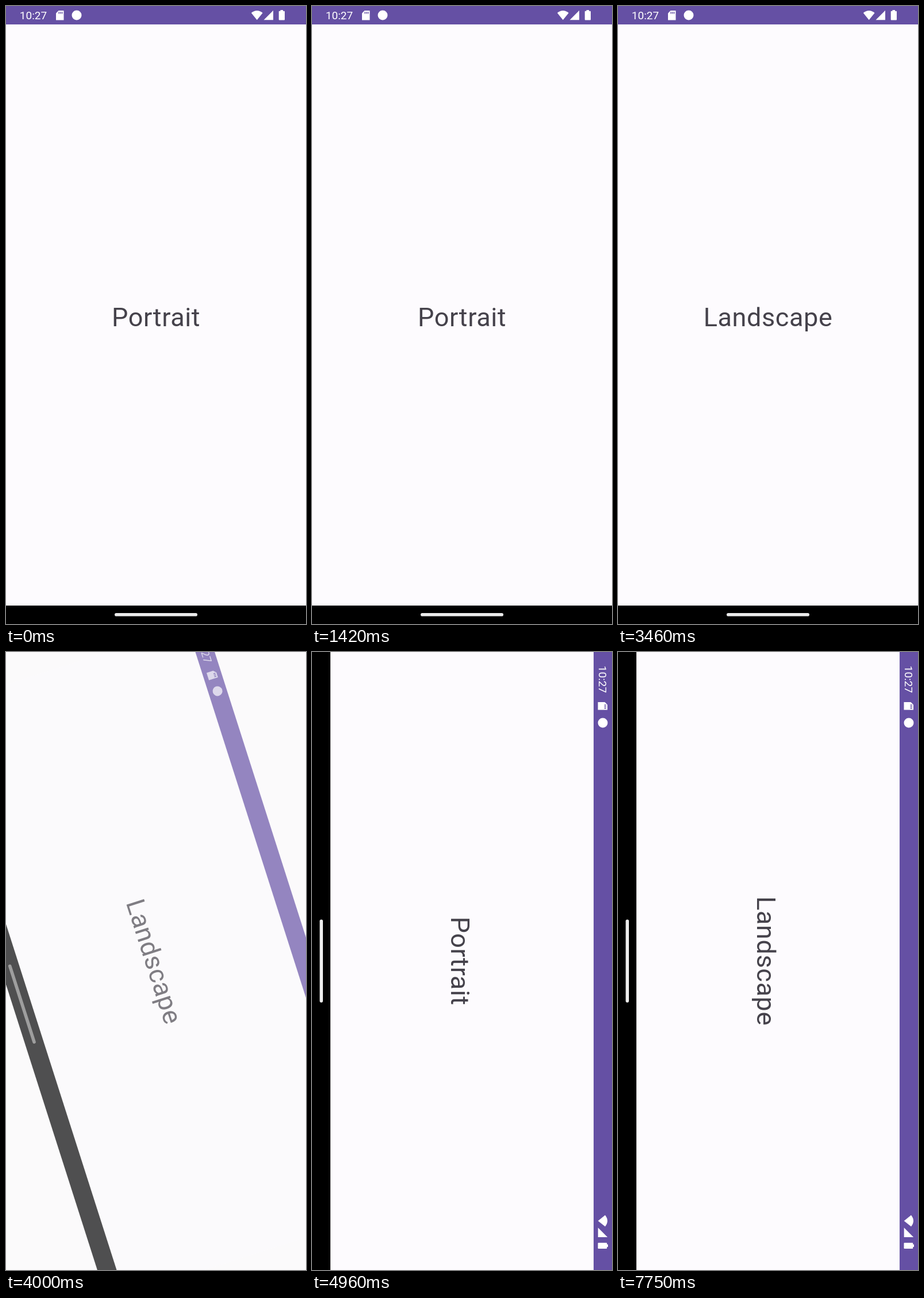
An HTML page with a canvas for the animation above (8 s loop, 522 by 1073 pixels).

```html
<!DOCTYPE html>
<html lang="en">
<head>
<meta charset="utf-8">
<title>Screen rotation</title>
<style>
  html, body { margin: 0; width: 100%; height: 100%; overflow: hidden; background: #fdfbfe; }
  canvas { display: block; }
</style>
</head>
<body>
<canvas id="stage" width="522" height="1073"></canvas>
<script>
const W = 522, H = 1073, LOOP = 8000, BAR = 32;
const TURN_START = 3827, TURN_TIME = 333;
const ctx = document.getElementById('stage').getContext('2d');

const clamp = x => Math.min(1, Math.max(0, x));

// cubic-bezier(0.4, 0, 0.2, 1), solved by bisection
function fastOutSlowIn(x) {
  let lo = 0, hi = 1, u = 0.5;
  for (let i = 0; i < 24; i++) {
    u = (lo + hi) / 2;
    const s = 1 - u;
    if (1.2 * s * s * u + 0.6 * s * u * u + u ** 3 < x) lo = u; else hi = u;
  }
  return 3 * u * u * (1 - u) + u ** 3;
}

function label(t) {
  return t < 3460 || (t >= 4960 && t < 7750) ? 'Portrait' : 'Landscape';
}

function rect(x, y, w, h, color) {
  ctx.fillStyle = color;
  ctx.fillRect(x, y, w, h);
}

function roundRect(x, y, w, h, r) {
  ctx.beginPath();
  ctx.roundRect(x, y, w, h, r);
  ctx.fill();
}

function polygon(...points) {
  ctx.beginPath();
  points.forEach(([x, y]) => ctx.lineTo(x, y));
  ctx.closePath();
  ctx.fill();
}

function text(str, x, y, size, align, spacing) {
  ctx.font = `${size}px Roboto, sans-serif`;
  ctx.letterSpacing = spacing + 'px';
  ctx.textAlign = align;
  ctx.fillText(str, x, y);
}

function statusBar(w) {
  const purple = '#6550a4';
  rect(0, 0, w, BAR, purple);
  ctx.fillStyle = '#fff';
  text('10:27', 23.8, 23, 19, 'left', 0);

  // memory card
  polygon([91.5, 8], [100.5, 8], [100.5, 24.5], [87, 24.5], [87, 12.5]);
  for (let i = 0; i < 3; i++) rect(91.5 + i * 2.7, 10, 1.4, 3.6, purple);

  ctx.fillStyle = '#fff';
  ctx.beginPath();
  ctx.arc(123, 16, 8.5, 0, 2 * Math.PI);
  ctx.fill();

  // wifi, signal, battery
  const r = w - W;
  ctx.beginPath();
  ctx.moveTo(r + 436.7, 24.3);
  ctx.lineTo(r + 426.8, 12);
  ctx.quadraticCurveTo(r + 436.7, 4, r + 446.6, 12);
  ctx.fill();
  polygon([r + 448.5, 24.3], [r + 465, 24.3], [r + 465, 7.8]);
  ctx.fillRect(r + 477.5, 7, 4.5, 3);
  roundRect(r + 474.7, 8.8, 10.3, 15.7, 1);
}

function screen(w, h, str, grey) {
  rect(0, 0, w, h, '#fdfbfe');
  statusBar(w);
  ctx.fillStyle = '#45424b';
  text(str, w / 2, h / 2 + 19, 45, 'center', 0.6);
  rect(0, h - BAR, w, BAR, '#000');
  ctx.fillStyle = `rgb(${grey}, ${grey}, ${grey})`;
  roundRect(w / 2 - 72, h - 19, 144, 5.6, 2.8);
}

function turned(w, h, angle, alpha, str, grey) {
  if (alpha <= 0) return;
  ctx.save();
  ctx.globalAlpha = alpha;
  ctx.translate(W / 2, H / 2);
  ctx.rotate(angle);
  ctx.translate(-w / 2, -h / 2);
  screen(w, h, str, grey);
  ctx.restore();
}

function draw(t) {
  const age = t - TURN_START;
  const angle = fastOutSlowIn(clamp(age / TURN_TIME)) * Math.PI / 2;
  const fadeIn = 1 - (1 - clamp((age - 100) / 233)) ** 3;
  const grey = Math.round(196 + 40 * clamp((age - 303) / 120));
  rect(0, 0, W, H, '#fbfafb');
  turned(H, W, age >= TURN_TIME ? Math.PI / 2 : angle, fadeIn, label(t), grey);
  turned(W, H, angle, 1 - clamp(age / 116), label(t), 236);
}

const start = performance.now();
function tick() {
  draw((performance.now() - start) % LOOP);
  requestAnimationFrame(tick);
}
tick();
</script>
</body>
</html>
```
